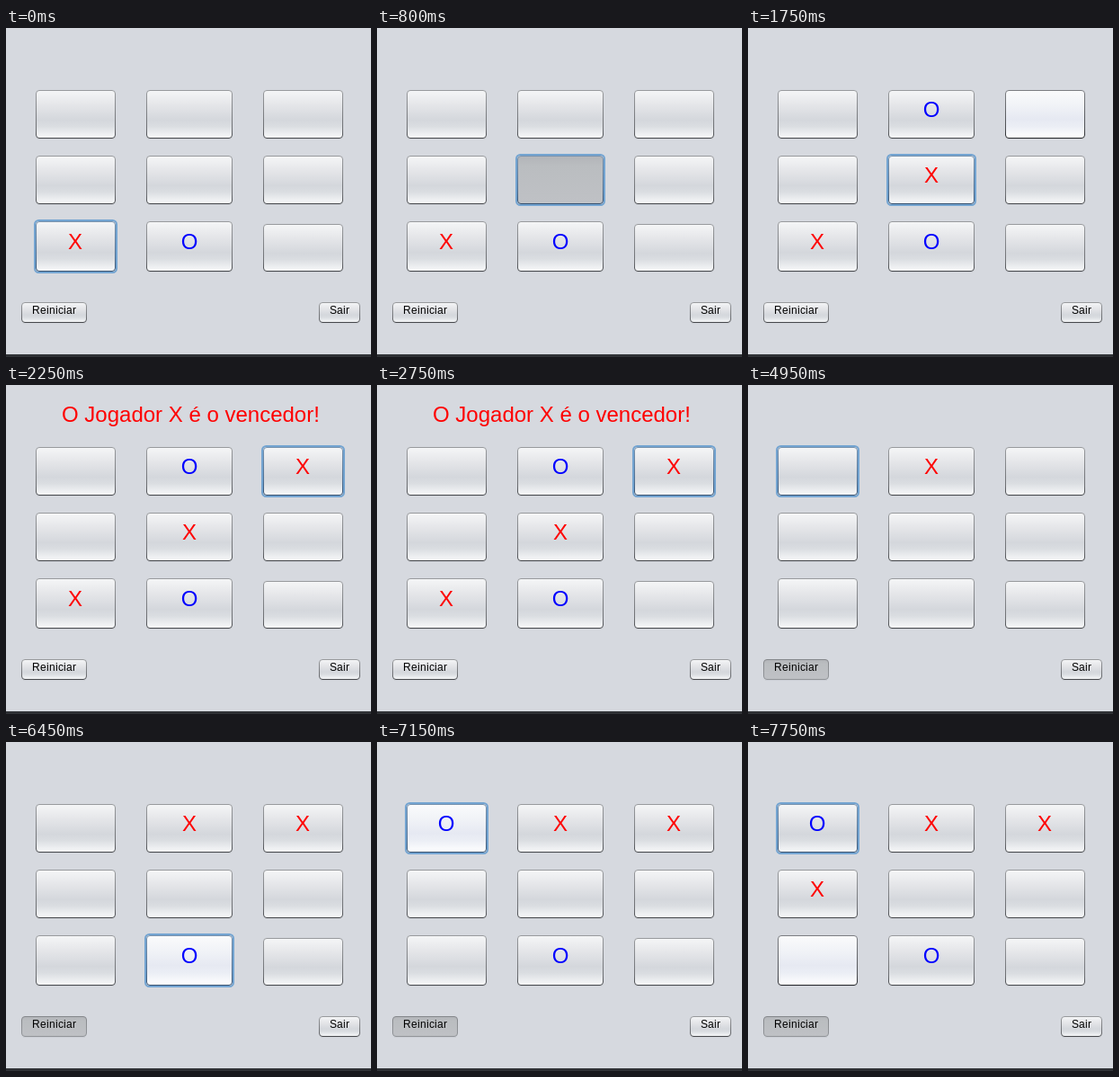
An HTML page that plays this animation: 406x366 px, repeating every 8 s.

```html
<!DOCTYPE html>
<html lang="pt">
<head>
<meta charset="utf-8">
<title>Jogo da velha</title>
<style>
  html, body { margin: 0; width: 100%; height: 100%; overflow: hidden; background: #d6d9df; }
  svg { display: block; width: 406px; height: 366px; }
  text { font: 12px "Liberation Sans", Arial, sans-serif; fill: #000; white-space: pre; }
  .big { font-size: 24px; fill: #f00; }
  .mark { text-anchor: middle; }
  .O { fill: #00f; }
  .body { fill: url(#normal); stroke: url(#edge); }
  .ring { fill: none; stroke: #73a4d1; stroke-width: 2; visibility: hidden; }
  .shade { fill: #000; opacity: .05; }
  .focus .ring { visibility: visible; }
  .focus .body { stroke: url(#edgeFocus); }
  .hover .body { fill: url(#hover); stroke: url(#edgeHover); }
  .press .body { fill: url(#press); stroke: url(#edgePress); }
  .hover.focus .body, .press.focus .body { stroke: url(#edgeFocus); }
</style>
</head>
<body>
<svg viewBox="0 0 406 366">
  <defs id="defs"></defs>
  <rect width="406" height="366" fill="#d6d9df"/>
  <rect y="363" width="406" height="3" fill="#303236"/>
  <text id="title" class="big" x="62" y="41">O Jogador X é o vencedor!</text>
  <g id="board"></g>
  <g id="menu">
    <g id="combo">
      <path d="M377 291.5H390.5Q393.5 291.5 393.5 294.5V308.5Q393.5 311.5 390.5 311.5H377Z" fill="url(#arrow)" stroke="url(#edgeArrow)"/>
      <path d="M377 291.5H290.5Q287.5 291.5 287.5 294.5V308.5Q287.5 311.5 290.5 311.5H377" fill="url(#normal)" stroke="url(#edge)"/>
      <path d="M377.5 292V311" stroke="#6d87a2"/>
      <path d="M381 299H389L385 305Z" fill="#1d2733"/>
    </g>
  </g>
  <g id="foot"></g>
</svg>
<script>
const $ = id => document.getElementById(id);
const LOOP = 8000;

function add(parent, tag, attrs) {
  const el = document.createElementNS('http://www.w3.org/2000/svg', tag);
  for (const k in attrs) el.setAttribute(k, attrs[k]);
  return parent.appendChild(el);
}

const gradients = {
  normal: [0, '#f5f6f7', .3, '#e5e6e9', .62, '#d4d7dc', .75, '#dadde1', 1, '#f8f9fa'],
  hover: [0, '#fafbfc', .3, '#f1f3f7', .6, '#e6e9f2', .75, '#ebeef5', 1, '#ffffff'],
  press: [0, '#b2b4b8', .2, '#babdc0', 1, '#bfc1c5'],
  arrow: [0, '#d0dce7', .4, '#a9bfd3', .62, '#8fabc5', 1, '#c3d8e9'],
  edge: [0, '#989a9d', .8, '#6c6e72', 1, '#46484c'],
  edgeHover: [0, '#7c7e82', .8, '#4b4d51', 1, '#222428'],
  edgePress: [0, '#85878b', 1, '#929599'],
  edgeFocus: [0, '#7892ad', .7, '#4c6d91', 1, '#34506f'],
  edgeArrow: [0, '#7f95ac', 1, '#3a506a']
};
for (const id in gradients) {
  const g = add($('defs'), 'linearGradient', { id, x1: 0, y1: 0, x2: 0, y2: 1 });
  const s = gradients[id];
  for (let i = 0; i < s.length; i += 2) add(g, 'stop', { offset: s[i], 'stop-color': s[i + 1] });
}

// Small labels advance in whole pixels, glyph by glyph.
const pen = document.createElement('canvas').getContext('2d');
pen.font = '12px "Liberation Sans", Arial, sans-serif';
function label(parent, str, x, y) {
  const xs = [...str].map(c => {
    const at = x;
    x += Math.round(pen.measureText(c).width);
    return at;
  });
  add(parent, 'text', { x: xs.join(' '), y }).textContent = str;
}

const buttons = {}, marks = {};
function button(parent, id, x, y, w, h) {
  const g = buttons[id] = add(parent, 'g', {});
  add(g, 'rect', { class: 'shade', x: x + 2, y: y + h, width: w - 4, height: 1 });
  add(g, 'rect', { class: 'ring', x: x - 1, y: y - 1, width: w + 2, height: h + 2, rx: 4.5 });
  add(g, 'rect', { class: 'body', x: x + .5, y: y + .5, width: w - 1, height: h - 1, rx: 3.5 });
  return g;
}

const cols = [[33, 89], [156, 96], [286, 89]];
const rows = [['a', 69, 54, 99], ['b', 142, 54, 172], ['c', 215, 56, 246]];
for (const [row, y, h, base] of rows) {
  cols.forEach(([x, w], i) => {
    const id = row + (i + 1), drop = id === 'c3' ? 3 : 0;
    const g = button($('board'), id, x, y + drop, w, h - drop);
    marks[id] = add(g, 'text', { x: Math.floor(x + w / 2), y: base });
  });
}
label(button($('menu'), 'start', 25, 290, 144, 23), 'Iniciar com a Maquina', 37, 303);
label($('menu'), 'Oponente', 205, 303);
label($('combo'), 'Maquina', 292, 303);
label(button($('foot'), 'reset', 17, 305, 73, 23), 'Reiniciar', 29, 318);
label(button($('foot'), 'exit', 348, 305, 46, 23), 'Sair', 360, 318);

// Each step changes part of the state; cells map to their marks.
const steps = [
  [0, { focus: 'c1', cells: { c1: 'X', c2: 'O' } }],
  [200, { hover: 'c2' }],
  [300, { hover: '' }],
  [350, { hover: 'b2' }],
  [650, { press: 'b2' }],
  [700, { focus: 'b2' }],
  [850, { press: '', cells: { b2: 'X' } }],
  [900, { cells: { a2: 'O' } }],
  [1300, { hover: 'b3' }],
  [1750, { hover: 'a3' }],
  [2000, { press: 'a3' }],
  [2050, { focus: 'a3' }],
  [2200, { press: '', title: true, cells: { a3: 'X' } }],
  [2250, { hover: '' }],
  [2300, { hover: 'b3' }],
  [2500, { hover: '' }],
  [2550, { hover: 'c3' }],
  [2750, { hover: '' }],
  [3500, { hover: 'reset' }],
  [3800, { stuck: 'reset' }],
  [3850, { focus: 'reset' }],
  [3950, { hover: '', title: false, menu: true, clear: true }],
  [4350, { hover: 'start' }],
  [4700, { press: 'start', focus: 'start' }],
  [4800, { press: '', cells: { a2: 'X' } }],
  [4950, { hover: '', focus: 'a1', menu: false }],
  [5450, { hover: 'c2' }],
  [5850, { press: 'c2' }],
  [5900, { focus: 'c2' }],
  [6050, { press: '', hover: '', cells: { c2: 'O', a3: 'X' } }],
  [6450, { hover: 'c2' }],
  [6650, { hover: '' }],
  [6800, { hover: 'a1' }],
  [7000, { press: 'a1' }],
  [7050, { focus: 'a1' }],
  [7150, { press: '', cells: { a1: 'O' } }],
  [7200, { cells: { b1: 'X' } }],
  [7250, { hover: '' }],
  [7300, { hover: 'b1' }],
  [7700, { hover: '' }],
  [7750, { hover: 'c1' }]
];

function stateAt(t) {
  const s = {};
  let cells = {};
  for (const [at, change] of steps) {
    if (at > t) break;
    if (change.clear) cells = {};
    Object.assign(cells, change.cells);
    Object.assign(s, change);
  }
  s.cells = cells;
  return s;
}

function draw(t) {
  const s = stateAt(t);
  for (const id in buttons) {
    const down = id === s.press || id === s.stuck;
    const look = down ? 'press' : id === s.hover ? 'hover' : '';
    buttons[id].setAttribute('class', look + (id === s.focus ? ' focus' : ''));
  }
  for (const id in marks) {
    const m = s.cells[id] || '';
    marks[id].textContent = m;
    marks[id].setAttribute('class', 'big mark ' + m);
  }
  $('title').style.display = s.title ? '' : 'none';
  $('menu').style.display = s.menu ? '' : 'none';
  $('foot').setAttribute('transform', `translate(0 ${s.menu ? 27 : 0})`);
}

const begin = performance.now();
function tick() {
  draw((performance.now() - begin) % LOOP);
  requestAnimationFrame(tick);
}
tick();
</script>
</body>
</html>
```
